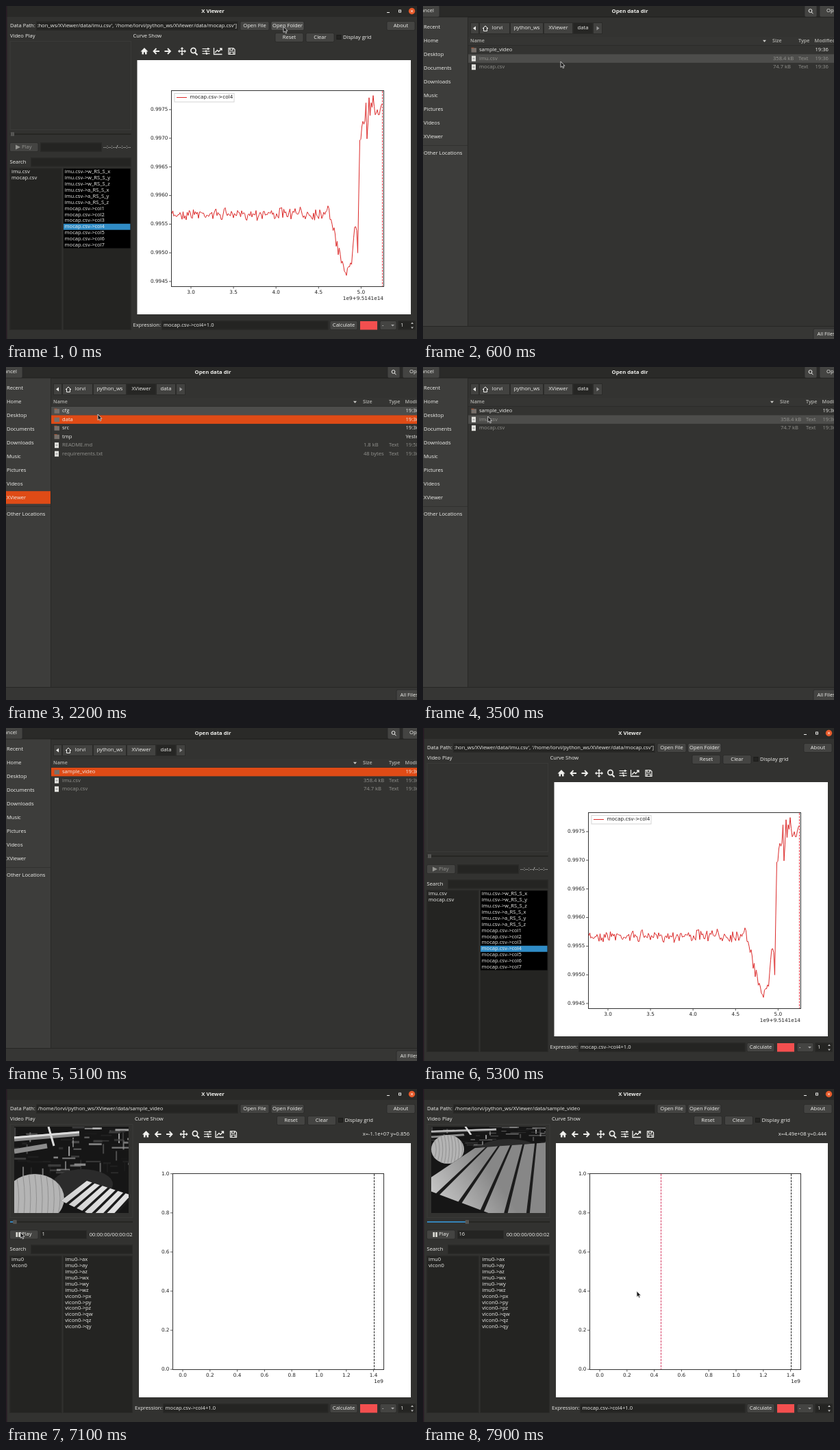
Animation of 600 by 486 pixels, one loop 8000 ms. Source, as an HTML page with a canvas:

```html
<!DOCTYPE html>
<html lang="en">
<head>
<meta charset="utf-8">
<title>X Viewer</title>
<style>
html, body { margin: 0; width: 100%; height: 100%; overflow: hidden; background: #323230; }
canvas { display: block; }
</style>
</head>
<body>
<canvas id="stage" width="600" height="486"></canvas>
<script>
const g = document.getElementById('stage').getContext('2d');
const LOOP = 8000, STEP = 100;
const UI = '"Open Sans", sans-serif', PLOT = '"DejaVu Sans", sans-serif';
const INK = '#f0f0ed', DIM = '#93938f', ORANGE = '#df4b16';
const HOME = '/home/lorvi/python_ws/XViewer/data/';

// Pointer stops: time, x, y
const STOPS = [
  [0, 405, 30], [200, 405, 30], [600, 201, 81], [1200, 18, 192], [1900, 18, 194], [2200, 134, 69],
  [3000, 96, 75], [4500, 92, 66], [5000, 612, 4], [5600, 612, 4], [6200, 255.81, 164.6],
  [6700, 21, 209], [7200, 21, 209], [7700, 382.65, 269.8], [8000, 276.75, 307.6]
];

const mix = (a, b, p) => a + (b - a) * p;
const mixPoint = (a, b, p) => a.map((v, i) => mix(v, b[i], p));
const times = (n, f) => Array.from({ length: n }, (_, i) => f(i));

// Point on a polyline whose first coordinate is the parameter
function along(keys, t) {
  const i = Math.max(1, keys.findIndex(k => k[0] > t)), a = keys[i - 1], b = keys[i];
  return mixPoint(a, b, (t - a[0]) / (b[0] - a[0])).slice(1);
}
const pointer = t => along(STOPS, t);

function randomFrom(seed) {
  return () => (seed = seed * 16807 % 2147483647) / 2147483647;
}

function rect(x, y, w, h, color, border) {
  if (color) { g.fillStyle = color; g.fillRect(x, y, w, h); }
  if (border) { g.strokeStyle = border; g.lineWidth = 1; g.strokeRect(x + .5, y + .5, w - 1, h - 1); }
}
function text(s, x, y, { size = 7.6, color = INK, align = 'left', font = UI, weight = 400 } = {}) {
  g.font = `${weight} ${size}px ${font}`;
  g.fillStyle = color;
  g.textAlign = align;
  g.textBaseline = 'middle';
  g.fillText(s, x, y);
}
function stroke(path, color = INK, width = 1, dash = []) {
  g.strokeStyle = color;
  g.lineWidth = width;
  g.setLineDash(dash);
  g.stroke(new Path2D(path));
  g.setLineDash([]);
}
function fill(path, color = INK) {
  g.fillStyle = color;
  g.fill(new Path2D(path));
}
function ellipse(x, y, rx, ry, color) {
  g.beginPath();
  g.ellipse(x, y, rx, ry, 0, 0, 7);
  g.fillStyle = color;
  g.fill();
}
function ring(x, y, r, width) {
  g.beginPath();
  g.arc(x, y, r, 0, 7);
  g.strokeStyle = INK;
  g.lineWidth = width;
  g.stroke();
}
function clipped(x, y, w, h, paint) {
  g.save();
  g.beginPath();
  g.rect(x, y, w, h);
  g.clip();
  paint();
  g.restore();
}
function button(label, x, y, w, h = 13, back = '#444442') {
  g.beginPath();
  g.roundRect(x, y, w, h, 2);
  g.fillStyle = back;
  g.fill();
  g.strokeStyle = '#282826';
  g.lineWidth = .7;
  g.stroke();
  text(label, x + w / 2, y + h / 2, { align: 'center' });
}
const field = (x, y, w, h = 13) => rect(x, y, w, h, '#242422', '#2b2b29');
const title = s => text(s, 302, 8, { size: 7.7, weight: 700, align: 'center' });

function drawPointer([x, y]) {
  g.save();
  g.translate(x, y);
  const arrow = 'M0 0V8.5L2 6.8L3.3 9.8L4.8 9.2L3.5 6.3H6Z';
  fill(arrow, '#181818');
  stroke(arrow, '#e0e0e0', .8);
  g.restore();
}

// ---- folder dialog ----
const FOLDERS = {
  data: [['sample_video', '', '19:36'], ['imu.csv', '358.4 kB', '19:36'], ['mocap.csv', '74.7 kB', '19:36']],
  XViewer: [['cfg', '', '19:36'], ['data', '', '19:36'], ['src', '', '19:36'], ['tmp', '', 'Yesterday'],
    ['README.md', '1.8 kB', '19:58'], ['requirements.txt', '48 bytes', '19:36']]
};
const PLACES = ['Recent', 'Home', 'Desktop', 'Documents', 'Downloads', 'Music', 'Pictures', 'Videos', 'XViewer'];
const CRUMBS = [['', 13], ['lorvi', 45], ['python_ws', 49], ['XViewer', 43], ['data', 29], ['', 14]];

function drawDialog(t, [mx, my]) {
  const up = t >= 1400 && t < 3000, folder = up ? 'XViewer' : 'data';
  const shift = t >= 1400 ? 11 : 0;
  const selected = up ? 1 : t >= 4000 ? 0 : -1;

  rect(0, 0, 600, 486, '#333331');
  rect(0, 0, 600, 16, '#2a2a28');
  rect(0, 15.5, 600, 1, '#1f1f1d');
  title('Open data dir');
  button('', -10, -1, 34, 17);
  text('Cancel', 16, 7.5, { align: 'right' });
  button('', 557, -1, 18, 17);
  ring(565.5, 7, 2.4, 1);
  stroke('M567.3 9L569.5 11.3');
  button('', 579, -1, 40, 17);
  text('Open', 589, 7.5);

  rect(0, 16.5, 65, 451, '#3d3d3b');
  rect(65, 16.5, 1, 451, '#292927');
  PLACES.forEach((name, i) => {
    const y = 31.5 + i * 19.9;
    if (up && name === 'XViewer') rect(0, y - 9.5, 65, 18.5, ORANGE);
    else if (mx < 65 && Math.abs(my - y) < 9.5) rect(0, y - 9.5, 65, 18.5, '#484846');
    text(name, 1, y);
  });
  rect(0, 203, 65, 1, '#31312f');
  text('Other Locations', 1, 215.3);

  let left = 69;
  CRUMBS.forEach(([name, w], i) => {
    rect(left, 24, w, 17, name === folder ? '#262624' : '#424240', '#2b2b29');
    text(name, left + w / 2 + (i === 1 ? 4 : 0), 32.5, { align: 'center' });
    left += w;
  });
  fill('M77 29.5v6l-4 -3Z');
  fill('M253.5 29.5v6l4 -3Z', '#999');
  stroke('M87 33l4 -4l4 4M88.5 32v4.500h5v-4.500');

  rect(66, 45, 534, 12.5, '#353533');
  rect(66, 57, 534, .7, '#292927');
  ['Name', 'Size', 'Type', 'Modified'].forEach((s, i) =>
    text(s, [69, 510 + shift, 548 + shift, 571.5 + shift][i], 51.3, { color: '#b4b4b0', weight: 600, size: 7.2 }));
  fill(`M${496 + shift} 49.7h5l-2.5 3Z`, '#d0d0cc');

  const hover = mx > 66 ? Math.floor((my - 57.7) / 12.5) : -1;
  FOLDERS[folder].forEach(([name, size, date], i) => {
    const y = 64.2 + i * 12.5, color = size ? DIM : INK;
    if (i === selected || i === hover) rect(66, y - 6.3, 534, 12.5, i === selected ? ORANGE : '#4d4d4b');
    if (size) {
      rect(71, y - 4, 6, 8, '#e4e4e0');
      rect(72.5, y - 1, 3, 2, '#aaa');
      text('Text', 548 + shift, y, { color });
    } else {
      rect(70.5, y - 3, 7.5, 6.5, '#77706b');
      rect(70.5, y - 3.5, 4, 1, '#b45a38');
    }
    text(name, 82, y, { color });
    text(size, 511 + shift, y, { color });
    text(date, 572.5 + shift, y, { color });
  });

  rect(0, 467, 600, 19, '#363634');
  rect(0, 467, 600, 1, '#272725');
  button('', 570, 471, 50, 18);
  text('All Files', 575.5, 479.5);
}

// ---- video: the camera closes in on a pallet as p goes from 0 to 1 ----
function drawVideo(p) {
  const random = randomFrom(11);
  const grey = v => `rgb(${v},${v},${v})`;
  rect(12, 55, 167, 126, '#161616');

  // Cluttered hall with pipes, moving up out of view
  g.save();
  g.translate(12, 55);
  g.scale(1, mix(1, .42, p));
  for (let i = 0; i < 80; i++) {
    const x = random() * 167, y = random() * 68, tall = random() < .3;
    g.globalAlpha = .75;
    rect(x, y, tall ? 2 : 6 + random() * 20, tall ? 14 : 1.5 + random() * 2, grey(25 + 190 * random() ** 2));
  }
  g.globalAlpha = 1;
  stroke('M0 18L95 10M0 36L48 28', '#8c8c8c', 7);
  stroke('M0 16L95 8M50 0L58 28', '#dcdcdc', 3);
  g.restore();

  // Tarpaulin and net
  ellipse(mix(112, 125, p), mix(139, 86, p), mix(44, 40, p), mix(22, 13, p), '#2b2b2b');
  const x = mix(42, 36, p), y = mix(160, 88, p), rx = mix(43, 24, p), ry = mix(36, 21, p);
  ellipse(x, y, rx, ry, '#b4b4b4');
  for (let i = -4; i <= 4; i++) {
    const dx = rx * i / 5, dy = ry * Math.sqrt(1 - i * i / 25);
    stroke(`M${x + dx} ${y - dy}q5 ${dy} 0 ${2 * dy}`, '#888', .8);
  }

  // Planks fan out between a far edge and a near edge
  const farL = mixPoint([118, 134], [76, 86], p), farR = mixPoint([186, 156], [184, 78], p);
  const nearL = mixPoint([80, 163], [-8, 142], p), nearR = mixPoint([150, 196], [186, 215], p);
  const quad = (a, b, c, d, color) => fill(`M${a}L${b}L${c}L${d}Z`, color);
  quad(farL, farR, nearR, nearL, '#1c1c1c');
  const shade = g.createLinearGradient(...farL, ...nearL);
  shade.addColorStop(0, grey(mix(225, 135, p)));
  shade.addColorStop(1, grey(205));
  for (let i = 0; i < 6; i++) {
    const a = i / 6, b = (i + mix(.68, .84, p)) / 6;
    quad(mixPoint(farL, farR, a), mixPoint(farL, farR, b), mixPoint(nearL, nearR, b), mixPoint(nearL, nearR, a), shade);
  }
}

// ---- plots ----
const LABEL = { size: 7.3, color: '#222', font: PLOT };
const AX = { left: 244, right: 551.5, top: 123.5, bottom: 409.2, x0: 258, perBillion: 199 };

// Trend of the curve: x, y, noise
const TREND = [[242, 304, 10], [462, 303, 10], [471, 295, 10], [480, 337, 10], [488, 367, 12], [497, 388, 12],
  [504, 380, 12], [510, 310, 12], [514, 350, 40], [516, 180, 25], [527, 163, 38], [545, 147, 16], [552, 142, 3]];

function drawAxes(left, xTicks, yTicks, offset) {
  rect(left, 123, 552 - left, 287, null, '#333');
  xTicks.forEach(([s, x]) => {
    stroke(`M${x} 409.5v3`, '#333', .8);
    text(s, x, 418, { ...LABEL, align: 'center' });
  });
  yTicks.forEach(([s, y]) => {
    stroke(`M${left} ${y}h-3`, '#333', .8);
    text(s, left - 4.5, y, { ...LABEL, align: 'right' });
  });
  text(offset, 551, 427, { ...LABEL, align: 'right' });
}
const marker = (x, color) => stroke(`M${x} 124V409`, color, 1, [3, 1.5]);

function drawCurve() {
  drawAxes(241, times(5, i => [(3 + i / 2).toFixed(1), 270 + 62.1 * i]),
    times(7, i => [(.9945 + i * .0005).toFixed(4), 402 - 41.8 * i]), '1e9+9.5141e14');
  const random = randomFrom(7);
  g.beginPath();
  for (let x = 242; x < 551; x += 1.5) {
    const [y, noise] = along(TREND, x);
    g.lineTo(x, y + (random() + random() - 1) * noise);
  }
  g.strokeStyle = '#dc2a2a';
  g.lineWidth = 1;
  g.stroke();
  marker(549.5, '#d8303c');
  rect(245.5, 127, 88, 13.5, '#fff', '#d4d4d4');
  stroke('M249 133.5H264', '#dc2a2a');
  text('mocap.csv->col4', 268.5, 133.5, LABEL);
}

const inAxes = ([x, y]) => x > AX.left && x < AX.right && y > AX.top && y < AX.bottom;

function coordinates([x, y]) {
  const [m, e] = ((x - AX.x0) / AX.perBillion * 1e9).toExponential(2).split('e');
  const value = (AX.bottom - y) / (AX.bottom - AX.top);
  return `x=${+m}e${e[0]}${e.slice(1).padStart(2, '0')} y=${value.toPrecision(3)}`;
}

function drawEmptyPlot(t) {
  drawAxes(243, times(8, i => [(i / 5).toFixed(1), 258 + 39.8 * i]),
    times(6, i => [(i / 5).toFixed(1), 409.2 - 57.1 * i]), '1e9');
  marker(537.5, '#222');
  // The readout trails the pointer by one step and keeps its last value.
  let last = t - STEP;
  if (inAxes(pointer(last))) marker(Math.round(pointer(last)[0]) + .5, '#d63a62');
  while (last >= 5700 && !inAxes(pointer(last))) last -= STEP;
  if (last >= 5700) text(coordinates(pointer(last)), 589, 66, { align: 'right' });
}

// ---- main window ----
function drawToolbar(o) {
  g.save();
  g.translate(o, 66);
  fill('M196.5 .5L202 -5l5.500 5.500h-2v4h-2.500v-3h-2v3h-2.500v-4Z');
  stroke('M224 0h-8.500m4 -4l-4 4l4 4M231.500 0h8.500m-4 -4l4 4l-4 4', INK, 1.8);
  stroke('M252 0h10M257 -5v10', INK, 1.4);
  for (let i = 0; i < 4; i++) {
    g.save();
    g.translate(257, 0);
    g.rotate(i * Math.PI / 2);
    fill('M6 0l-2.500 -2.500v5Z');
    g.restore();
  }
  ring(273.5, -1, 3.6, 1.7);
  stroke('M276 2l3.500 3.500', INK, 2);
  for (let i = -1; i < 2; i++) {
    stroke(`M286.500 ${i * 3.5}h11`, INK, 1.1);
    stroke(`M${292 + i * i * 2 - i} ${i * 3.5 - 1.5}v3`, INK, 1.7);
  }
  stroke('M303.500 -5v9.500h12M305 2l3.500 -3.500l2 2l4 -4M312 -4h3v3', INK, 1.3);
  stroke('M325 -4.500h7l2 2v7h-9ZM327 -4.500v3h4v-3M327 4.500v-3.500h5v3.500', INK, 1.2);
  g.restore();
}

function drawPlayer(t, loaded, edge) {
  const frame = t < 7100 ? 0 : 1 + Math.round((t - 7100) / 800 * 15);
  const sliderY = loaded ? 194 : 187, y = loaded ? 206 : 199.5, knob = 9.5 + frame * 3.43;
  rect(5.5, 51, edge - 5, sliderY - 57, null, '#3a3a38');
  if (loaded) clipped(12, 55, 167, 126, () => drawVideo(Math.max(0, frame - 1) / 15));
  rect(6, sliderY - .8, edge - 6, 1.6, '#232321');
  if (frame) rect(6, sliderY - .8, knob - 6, 1.6, '#3a9bdc');
  rect(knob - 2.5, sliderY - 2.5, 5, 5, '#50504e', '#5c5c5a');

  button('', 5.5, y, 41.5);
  text('Play', 23, y + 6.5, { color: loaded ? INK : DIM });
  if (frame) {
    rect(14.5, y + 3, 2.6, 7, '#deded8');
    rect(18.3, y + 3, 2.6, 7, '#deded8');
  } else fill(`M14 ${y + 3}v7l7 -3.500Z`, loaded ? '#8bc34a' : DIM);
  field(50, y, loaded ? 68 : 90);
  if (loaded) text(frame, 52.5, y + 6.5);
  text(loaded ? '00:00:00/00:00:02' : '--:--:--/--:--:--', edge - .3, y + 6.8, { align: 'right' });
}

function drawLists(loaded, edge) {
  const searchY = loaded ? 234 : 228, top = loaded ? 243.5 : 236.5;
  const rowY = i => top + 6 + i * 8.86;
  const names = (prefix, list) => list.split(' ').map(s => prefix + s);
  text('Search', 5.5, searchY);
  field(36, searchY - 6.5, edge - 36);
  field(5.5, top, 76, 473 - top);
  field(83, top, edge - 83, 473 - top);
  if (!loaded) {
    rect(84, top + 1, edge - 85, 116, '#000');
    rect(84, rowY(9) - 4.5, edge - 85, 9, '#308cc6');
  }
  const files = loaded ? ['imu0', 'vicon0'] : ['imu.csv', 'mocap.csv'];
  const columns = loaded
    ? [...names('imu0->', 'ax ay az wx wy wz'), ...names('vicon0->', 'px py pz qw qz qy')]
    : [...names('imu.csv->w_RS_S_', 'x y z'), ...names('imu.csv->a_RS_S_', 'x y z'),
      ...names('mocap.csv->col', '1 2 3 4 5 6 7')];
  files.forEach((s, i) => text(s, 8, rowY(i)));
  columns.forEach((s, i) => text(s, loaded ? 86.3 : 85.5, rowY(i)));
}

function drawMain(t, loaded) {
  const o = loaded ? 2.5 : 0, edge = loaded ? 185 : 182.5;
  rect(0, 0, 600, 486, '#323230');
  rect(0, 0, 600, 16, '#292927');
  rect(0, 0, 1.5, 486, '#271a24');
  title('X Viewer');
  stroke('M556 9.500h4');
  rect(573, 5.5, 4, 4, null, INK);
  ellipse(592.5, 7.5, 4.7, 4.7, '#e65a2b');
  stroke('M591 6l3 3m0 -3l-3 3', '#fff', .9);

  text('Data Path:', 6, 29.2);
  field(44, 22.5, 295);
  clipped(46, 23, 292, 12, () => {
    if (loaded) text(HOME + 'sample_video', 46.5, 29.2);
    else text(`['${HOME}imu.csv', '${HOME}mocap.csv']`, 337, 29.2, { align: 'right' });
  });
  const pressed = t >= 100 && t < 200;
  button('Open File', 342, 22.5, 42);
  button('Open Folder', 387, 22.5, 48, 13, loaded ? '#444442' : pressed ? '#2b2b29' : '#50504e');
  button('About', 556, 22.5, 41);
  text('Video Play', 6, 44);
  text('Curve Show', 185.5 + o, 44);
  button('Reset', 393 + o, 39.5, 41);
  button('Clear', 438 + o, 39.5, 41);
  rect(482.5 + o, 42, 7, 7, '#242422', '#1c1c1a');
  text('Display grid', 492 + o, 45.7);

  drawPlayer(t, loaded, edge);
  drawLists(loaded, edge);
  drawToolbar(o);
  rect(191.5 + o, 79, 399.5 - o, 371, '#fff');
  if (loaded) drawEmptyPlot(t);
  else drawCurve();

  text('Expression:', 185.5 + o, 466.3);
  field(227 + o, 459.5, 243.5 - o);
  text('mocap.csv->col4+1.0', 230 + o, 466.3);
  button('Calculate', 473, 459.5, 40);
  rect(517, 460, 25, 12.5, '#f34f4f');
  button('', 546, 459.5, 24);
  text('-', 549, 466);
  fill('M562 465h5l-2.500 2.500Z', '#aaa');
  field(572.5, 459.5, 25);
  text('1', 576, 466.3);
  fill('M591 464h4l-2 -2.500ZM591 468.500h4l-2 2.500Z', '#bbb');
}

const start = performance.now();
function draw() {
  const t = Math.floor((performance.now() - start) % LOOP / STEP) * STEP, at = pointer(t);
  if (t >= 300 && t < 5300) drawDialog(t, at);
  else drawMain(t, t >= 5400);
  drawPointer(at);
  requestAnimationFrame(draw);
}
draw();
</script>
</body>
</html>
```
